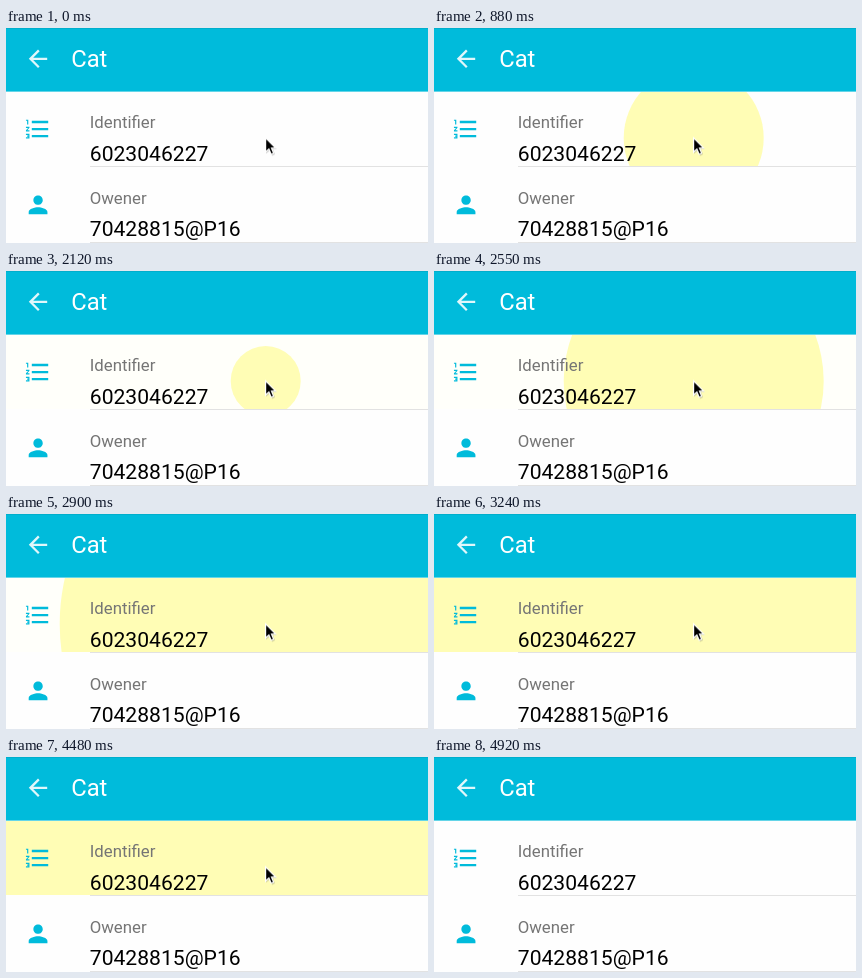
Animation, 422 px wide and 215 px high, one loop 5.44 s. Source, as an HTML page:

```html
<!DOCTYPE html>
<html lang="en">
<head>
<meta charset="utf-8">
<title>Cat</title>
<style>
  html, body { margin: 0; width: 100%; height: 100%; overflow: hidden; background: #fefefe; }
  svg { display: block; }
  text { font-family: Roboto, "Open Sans", sans-serif; }
  .title { font-size: 23.8px; fill: #fff; }
  .label { font-size: 16.8px; fill: #757575; }
  .value { font-size: 21.1px; fill: #000; }
  .icon { fill: #00bbdb; }
  .line { fill: #e2e2e2; }

  .tint { fill: #fffffa; opacity: 0; animation: tint 5440ms step-end infinite; }
  .ripple { fill: #fffdb5; r: 0; animation: ripple 5440ms step-end infinite; }
  .cursor { animation: cursor 5440ms step-end infinite; }

  /* faint remainder of the first tap */
  @keyframes tint {
    0% { opacity: 0; }
    20.95% { opacity: 1; }
    69.3% { opacity: 0; }
    100% { opacity: 0; }
  }

  /* quick tap, long press with steady growth, quick tap */
  @keyframes ripple {
    0% { r: 0; }
    16.17% { r: 70px; }
    17.75% { r: 185px; }
    19.3% { r: 258px; }
    20.95% { r: 0; }
    38.82% { r: 35px; animation-timing-function: steps(13, end); }
    59.55% { r: 282px; }
    69.3% { r: 0; }
    79.04% { r: 80px; }
    80.69% { r: 200px; }
    82.35% { r: 282px; }
    84% { r: 0; }
    100% { r: 0; }
  }

  @keyframes cursor {
    0% { transform: translate(259px, 109.3px); }
    87.13% { transform: translate(277px, 138px); }
    88.78% { transform: translate(322px, 201px); }
    90.44% { transform: translate(340px, 240px); }
    100% { transform: translate(340px, 240px); }
  }
</style>
</head>
<body>
<svg width="422" height="215" viewBox="0 0 422 215">
  <rect width="422" height="215" fill="#fefefe"/>

  <svg y="64" width="422" height="74" overflow="hidden">
    <rect class="tint" width="422" height="74"/>
    <circle class="ripple" cx="259.7" cy="46"/>
  </svg>

  <rect width="422" height="63.6" fill="#00bbdb"/>
  <rect width="422" height="1" fill="#000" opacity=".07"/>
  <path fill="#fff" opacity=".88" transform="translate(18.2 17) scale(1.15)"
    d="M20 11H7.83l5.59-5.59L12 4l-8 8 8 8 1.41-1.41L7.83 13H20z"/>
  <text class="title" x="65.2" y="39.3">Cat</text>

  <path class="icon" transform="translate(17.6 87) scale(1.172)"
    d="M2 17h2v.5H3v1h1v.5H2v1h3v-4H2zM3 8h1V4H2v1h1zM2 11h1.8L2 13.1v.9h3v-1H3.2L5 10.9V10H2zM7 5v2h14V5zM7 19h14v-2H7zM7 13h14v-2H7z"/>
  <text class="label" x="83.8" y="100">Identifier</text>
  <text class="value" x="83.8" y="132.6">6023046227</text>
  <rect class="line" x="84" y="138" width="338" height="1"/>

  <path class="icon" transform="translate(18 162.8) scale(1.172)"
    d="M12 12c2.21 0 4-1.79 4-4s-1.79-4-4-4-4 1.79-4 4 1.79 4 4 4zm0 2c-2.67 0-8 1.34-8 4v2h16v-2c0-2.66-5.33-4-8-4z"/>
  <text class="label" x="83.7" y="176.2">Owener</text>
  <text class="value" x="83.8" y="208.3">70428815@P16</text>
  <rect class="line" x="84" y="214" width="338" height="1"/>

  <g class="cursor">
    <path fill="#000" opacity=".22" d="M1 2V16.2L4.6 13.4 7 18.4 10 17 8 12H12z"/>
    <path fill="#000" stroke="#fff" stroke-width="1.2"
      d="M.6 .6V14.8L3.9 11.8 6.2 17 8.7 15.9 6.5 10.8H10.7z"/>
  </g>
</svg>
</body>
</html>
```
